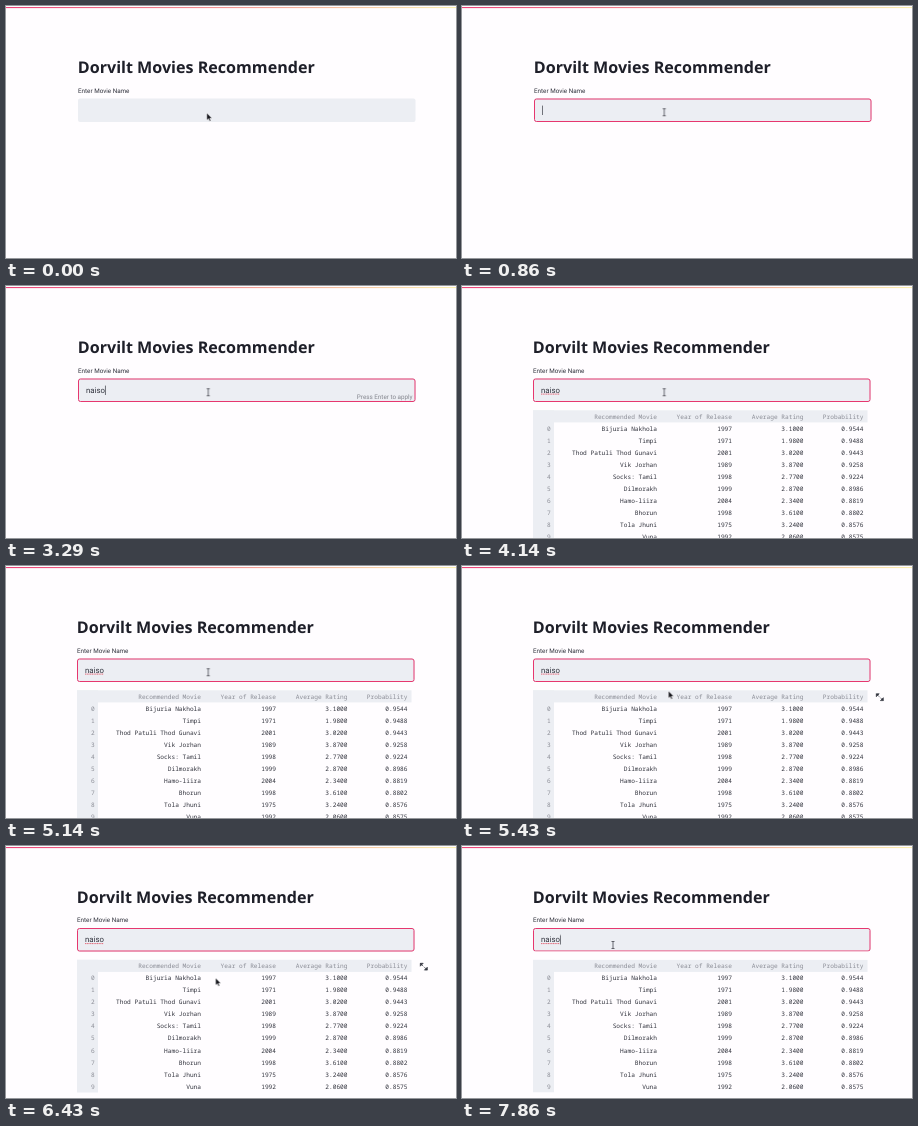
Animation, 450 px wide and 252 px high, one loop 8000 ms. Source, as an HTML page:

```html
<!DOCTYPE html>
<html lang="en">
<head>
<meta charset="utf-8">
<title>Movies Recommender</title>
<style>
  html, body { margin: 0; width: 100%; height: 100%; overflow: hidden; background: #fffdff; }
  svg { display: block; width: 100%; height: 100%; }
  text { font-family: Roboto, "Noto Sans", sans-serif; fill: #30323c; white-space: pre; text-rendering: geometricPrecision; }
  .title { font: 700 16.1px "Noto Sans", "Open Sans", sans-serif; fill: #1e1f29; }
  .label { font-size: 6.3px; }
  .typed { font-size: 7.8px; }
  .hint { font-size: 6.3px; fill: #85878f; text-anchor: end; }
  #table text { font: 6.17px "Noto Sans Mono", "DejaVu Sans Mono", monospace; text-anchor: end; }
  #table .dim { fill: #8a8c95; }
  .panel { fill: #eceef3; }
</style>
</head>
<body>
<svg viewBox="0 0 450 252">
  <defs>
    <linearGradient id="bar">
      <stop offset="0" stop-color="#ec4277"/>
      <stop offset="1" stop-color="#fbeeb0"/>
    </linearGradient>
  </defs>
  <g id="shift"><g id="page">
    <text class="title" x="71.8" y="67.2">Dorvilt Movies Recommender</text>
    <text class="label" x="72" y="86.5">Enter Movie Name</text>
    <rect class="panel" x="72" y="92.5" width="337.5" height="23.5" rx="2"/>
    <rect id="focus" x="72.5" y="93" width="336.5" height="22.5" rx="2" fill="none" stroke="#e6376f"/>
    <text class="typed" id="typed" x="80" y="106.7"></text>
    <path id="spelling" d="M80 108.1H98.6" stroke="#e0475a" stroke-width=".8" stroke-dasharray="1.2 .5"/>
    <path id="caret" d="M.4 99.6V109" stroke="#262730" stroke-width=".7"/>
    <text class="hint" id="hint" x="406.6" y="113.2">Press Enter to apply</text>
    <g id="table">
      <rect class="panel" x="72" y="124.3" width="334.5" height="12.1"/>
      <rect class="panel" x="72" y="124.3" width="21" height="132.7"/>
    </g>
    <g id="expand" fill="#333540" stroke="#333540">
      <path id="corner" d="M415.3 127.8h2.9l-2.9 2.9zl3 3" stroke-width=".7"/>
      <use href="#corner" transform="rotate(180 418.8 131.2)"/>
    </g>
  </g></g>
  <rect y="1" width="450" height="1.1" fill="url(#bar)"/>
  <g id="mouse">
    <path id="arrow" d="M0 0V7.2L1.7 5.7 2.8 8.3 4 7.8 2.9 5.3H5.1Z" fill="#16161c" stroke="#fff" stroke-width=".4"/>
    <path id="beam" d="M-1.5-3.5H1.5M0-3.5V3.5M-1.5 3.5H1.5" fill="none" stroke="#44464e" stroke-width=".8"/>
  </g>
</svg>
<script>
const LOOP = 8000;
const word = "naiso";
const columns = [196, 271, 342.5, 402.5];
const headings = ["Recommended Movie", "Year of Release", "Average Rating", "Probability"];
const movies = [
  ["Bijuria Nakhola", 1997, 3.10, .9544],
  ["Timpi", 1971, 1.98, .9488],
  ["Thod Patuli Thod Gunavi", 2001, 3.02, .9443],
  ["Vik Jorhan", 1989, 3.87, .9258],
  ["Socks: Tamil", 1998, 2.77, .9224],
  ["Dilmorakh", 1999, 2.87, .8986],
  ["Hamo-liira", 2004, 2.34, .8819],
  ["Bhorun", 1998, 3.61, .8802],
  ["Tola Jhuni", 1975, 3.24, .8576],
  ["Vuna", 1992, 2.06, .8575]
];

const $ = id => document.getElementById(id);

function add(parent, tag, content, attributes = {}) {
  const node = document.createElementNS("http://www.w3.org/2000/svg", tag);
  for (const name in attributes) node.setAttribute(name, attributes[name]);
  node.textContent = content;
  return parent.appendChild(node);
}

function addRow(row, cells, dim) {
  const y = 132.6 + row * 12.06;
  cells.forEach((cell, i) =>
    add($("table"), "text", cell, { x: columns[i], y, class: dim ? "dim" : "" }));
  if (row) add($("table"), "text", row - 1, { x: 89.8, y, class: "dim" });
}

// Plays [time, value] steps, each value held until the next.
function play(node, property, steps) {
  const frames = steps.map(([time, value]) =>
    ({ offset: time / LOOP, [property]: value, easing: "steps(1, end)" }));
  frames.push({ offset: 1, [property]: steps[steps.length - 1][1] });
  node.animate(frames, { duration: LOOP, iterations: Infinity }).startTime = 0;
}

const move = (node, steps) =>
  play(node, "transform", steps.map(([time, x, y]) => [time, `translate(${x}px, ${y}px)`]));

// Starts hidden and toggles at every given time.
const toggle = (node, ...times) =>
  play(node, "visibility", [0, ...times].map((time, i) => [time, i % 2 ? "visible" : "hidden"]));

addRow(0, headings, true);
movies.forEach(([name, year, rating, chance], i) =>
  addRow(i + 1, [name, year, rating.toFixed(4), chance.toFixed(4)]));

const keyTimes = [1570, 1860, 2000, 3000, 3150];
const letters = [...word].map(letter => add($("typed"), "tspan", letter));
const letterEnds = letters.map((_, i) => $("typed").getEndPositionOfChar(i).x);
letters.forEach((letter, i) => toggle(letter, keyTimes[i]));

move($("caret"), [[0, 80, 0], ...keyTimes.map((time, i) => [time, letterEnds[i], 0])]);
toggle($("caret"), 430, 1000, 1290, 2570, 2860, 3710, 4430, 5000, 5570, 6000, 6570, 7000, 7570);

toggle($("focus"), 430);
toggle($("hint"), 1570, 3570);
toggle($("spelling"), 3710);
toggle($("table"), 4000);
toggle($("expand"), 5430, 7140);
move($("shift"), [[0, 0, 0], [4000, -1, 0]]);
move($("page"), [
  [0, 0, 0], [5710, 0, -22], [5860, 0, -46], [6000, 0, -57.2],
  [6290, 0, -34], [6430, 0, -10.5]
]);

move($("mouse"), [
  [0, 200.8, 107], [140, 202.2, 106.2],
  [5290, 204, 113], [5430, 206.5, 125], [5570, 209.6, 132],
  [7000, 200, 122], [7140, 178, 108], [7290, 156, 100], [7570, 151, 99]
]);
toggle($("beam"), 140, 5430, 7290);
play($("arrow"), "visibility",
  [[0, "visible"], [140, "hidden"], [5430, "visible"], [7290, "hidden"]]);
</script>
</body>
</html>
```
